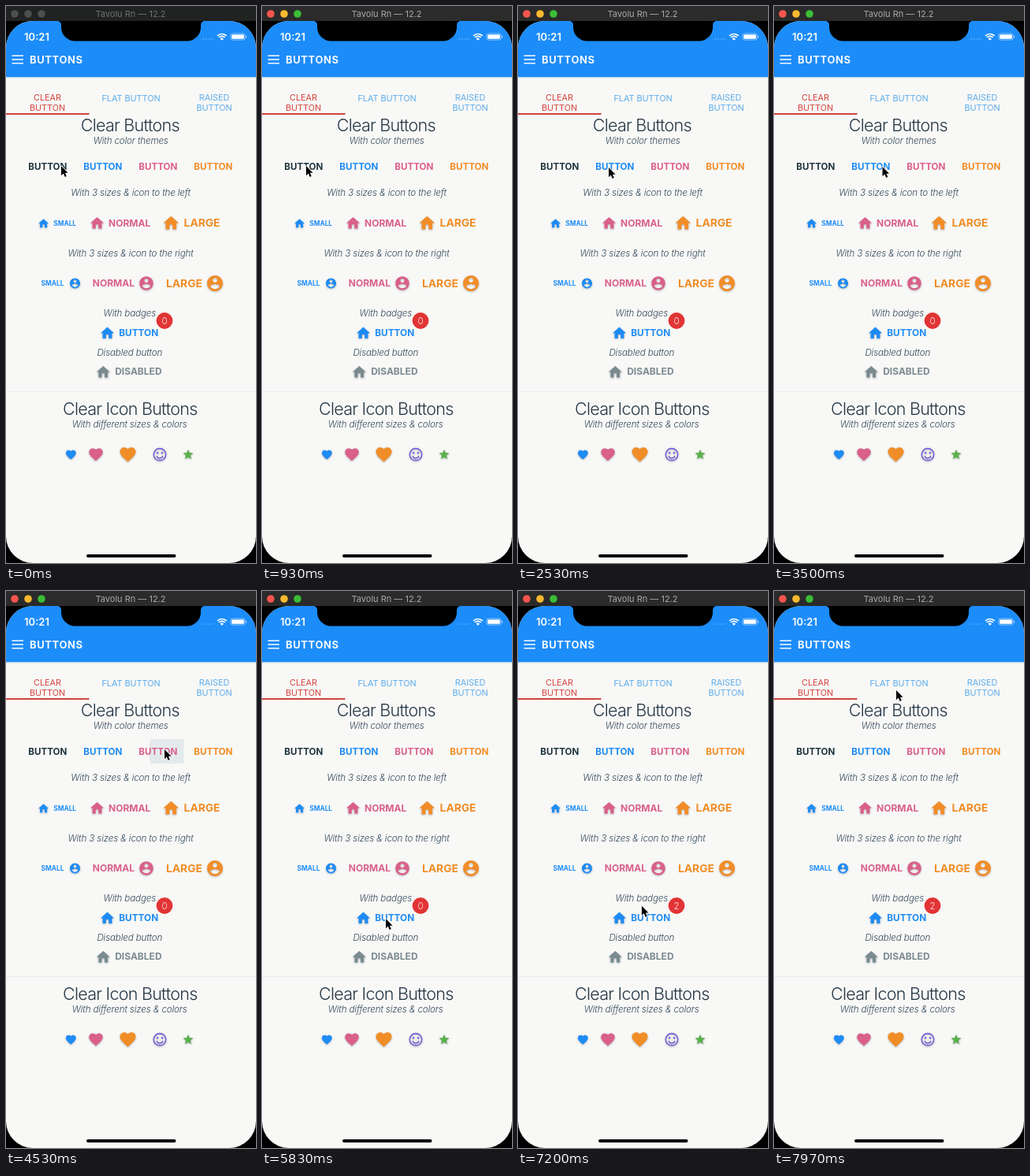
An HTML page with a canvas that plays this animation: 317x707 px, repeating every 8 s.

```html
<!DOCTYPE html>
<html lang="en">
<head>
<meta charset="utf-8">
<title>Buttons</title>
<style>
html, body { margin: 0; width: 100%; height: 100%; overflow: hidden; background: #000; }
canvas { display: block; width: 317px; height: 707px; }
</style>
</head>
<body>
<canvas id="stage"></canvas>
<script>
const W = 317, H = 707, LOOP = 8000;
const canvas = document.getElementById('stage');
const ctx = canvas.getContext('2d');
const ratio = window.devicePixelRatio || 1;
canvas.width = W * ratio;
canvas.height = H * ratio;

const BLUE = '#1e8cf5', PINK = '#da6089', ORANGE = '#f18d27', NAVY = '#20353f';
const RED = '#d2443d', SLATE = '#7a8b91', PURPLE = '#7b62d8', GREEN = '#5bb04d';
const PAPER = '#f8f8f6';

const ICONS = {
  home: new Path2D('M10 20v-6h4v6h5v-8h3L12 3 2 12h3v8z'),
  user: new Path2D('M12 2C6.48 2 2 6.48 2 12s4.48 10 10 10 10-4.48 10-10S17.52 2 12 2zm0 3c1.66 0 3 1.34 3 3s-1.34 3-3 3-3-1.34-3-3 1.34-3 3-3zm0 14.2c-2.5 0-4.71-1.28-6-3.22.03-1.99 4-3.08 6-3.08 1.99 0 5.97 1.09 6 3.08-1.29 1.94-3.5 3.22-6 3.22z'),
  heart: new Path2D('M12 21.35l-1.45-1.32C5.4 15.36 2 12.28 2 8.5 2 5.42 4.42 3 7.5 3c1.74 0 3.41.81 4.5 2.09C13.09 3.81 14.76 3 16.5 3 19.58 3 22 5.42 22 8.5c0 3.78-3.4 6.86-8.55 11.54z'),
  star: new Path2D('M12 17.27L18.18 21l-1.64-7.03L22 9.24l-7.19-.61L12 2 9.19 8.63 2 9.24l5.46 4.73L5.82 21z')
};
const NOTCH = new Path2D('M65 18H252V19A5 5 0 0 0 247 24V27A17.5 17.5 0 0 1 229.5 44.5H87.5A17.5 17.5 0 0 1 70 27V24A5 5 0 0 0 65 19Z');
const ARROW = new Path2D('M0 0V12.2L2.8 9.6L4.7 14L6.8 13.1L4.9 8.8H8.6Z');

// Pointer stops: time, x, y
const STOPS = [
  [0, 70, 203], [600, 56, 203], [2000, 56, 203], [2450, 115, 205],
  [3300, 115, 205], [3900, 201, 201], [4800, 201, 201], [5600, 157, 416],
  [7100, 157, 416], [7800, 155, 126], [LOOP, 155, 126]
];
const FOCUS = 700;
const BADGE_TAPS = [6000, 6750];
// Taps: time, then the button box
const TAPS = [
  [1350, 21, 188, 64.5, 31], [2750, 91, 188, 64.5, 31], [4250, 161, 188, 64.5, 31],
  ...BADGE_TAPS.map(t => [t - 100, 110, 399, 96, 31])
];

function text(str, x, y, font, color, align = 'center', spacing = 0) {
  ctx.font = font + ' Inter, sans-serif';
  ctx.letterSpacing = spacing + 'px';
  ctx.textAlign = align;
  ctx.fillStyle = color;
  ctx.fillText(str, x, y);
}
const heading = (s, y) => text(s, 157.3, y, '300 21.5px', '#263846', 'center', -0.74);
const caption = (s, x, y) => text(s, x, y, 'italic 300 11.6px', '#33485a', 'center', -0.14);
const label = (s, x, y, color, size = 11.8) => text(s, x, y, `700 ${size}px`, color, 'left');
const tab = (s, x, y, color) => text(s, x, y, '400 10.8px', color);

function rect(x, y, w, h, color) {
  ctx.fillStyle = color;
  ctx.fillRect(x, y, w, h);
}

function disc(x, y, r, color) {
  ctx.fillStyle = color;
  ctx.beginPath();
  ctx.arc(x, y, r, 0, 7);
  ctx.fill();
}

function pill(x, y, w, h, r, color) {
  ctx.fillStyle = color;
  ctx.beginPath();
  ctx.roundRect(x, y, w, h, r);
  ctx.fill();
}

function softShadow() {
  ctx.shadowColor = 'rgba(50, 60, 80, .35)';
  ctx.shadowBlur = 2.5 * ratio;
  ctx.shadowOffsetY = ratio;
}

// The glyphs span 20 of the 24 grid units
function icon(name, x, y, width, color) {
  const k = width / 20;
  ctx.save();
  softShadow();
  ctx.translate(x, y);
  ctx.scale(k, k);
  ctx.translate(-12, -12);
  ctx.fillStyle = color;
  ctx.fill(ICONS[name]);
  ctx.restore();
}

function smiley(x, y) {
  ctx.save();
  softShadow();
  ctx.strokeStyle = PURPLE;
  ctx.lineWidth = 1.6;
  ctx.beginPath();
  ctx.arc(x, y, 7.7, 0, 7);
  ctx.stroke();
  ctx.beginPath();
  ctx.arc(x, y + 0.4, 4.2, 0.35, Math.PI - 0.35);
  ctx.stroke();
  disc(x - 2.9, y - 2.1, 1.25, PURPLE);
  disc(x + 2.9, y - 2.1, 1.25, PURPLE);
  ctx.restore();
}

function pointer(t) {
  const i = STOPS.findIndex(s => s[0] > t);
  const [t0, x0, y0] = STOPS[i - 1], [t1, x1, y1] = STOPS[i];
  const p = (t - t0) / (t1 - t0), e = p * p * (3 - 2 * p);
  return [x0 + (x1 - x0) * e, y0 + (y1 - y0) * e];
}

function ripples(t) {
  for (const [start, x, y, w, h] of TAPS) {
    const age = t - start;
    if (age < 0 || age > 500) continue;
    const px = pointer(start)[0];
    ctx.save();
    ctx.beginPath();
    ctx.rect(x, y, w, h);
    ctx.clip();
    ctx.globalAlpha = Math.min(1, (500 - age) / 200);
    const grow = Math.min(1, age / 280);
    disc(px + 30, y + h / 2, 50 * (1 - (1 - grow) ** 2), '#e4eaec');
    ctx.restore();
  }
}

function titleBar(active) {
  rect(0, 0, W, 19, active ? '#2a2b2a' : '#202321');
  ['#f8564e', '#f6b930', '#3cbd38'].forEach((c, i) =>
    disc(11 + 17 * i, 10, 4.8, active ? c : '#4e504e'));
  text('Tavolu Rn — 12.2', 158, 14, '400 11px', active ? '#a9aaa8' : '#70726f');
}

function statusBar() {
  text('10:21', 39, 43.5, '600 13px', '#fff');
  for (let i = 0; i < 4; i++) disc(250 + 4 * i, 42, 0.8, 'rgba(255,255,255,.45)');
  ctx.strokeStyle = '#fff';
  ctx.lineWidth = 1.7;
  for (const r of [5.2, 8]) {
    ctx.beginPath();
    ctx.arc(273.8, 43.5, r, -Math.PI * 0.76, -Math.PI * 0.24);
    ctx.stroke();
  }
  ctx.fillStyle = '#fff';
  ctx.beginPath();
  ctx.moveTo(273.8, 43.8);
  ctx.arc(273.8, 43.8, 3, -Math.PI * 0.76, -Math.PI * 0.24);
  ctx.fill();
  ctx.lineWidth = 0.8;
  ctx.strokeStyle = 'rgba(255,255,255,.6)';
  ctx.beginPath();
  ctx.roundRect(284.9, 34.9, 18.2, 8.2, 2.4);
  ctx.stroke();
  pill(286.2, 36.2, 15.6, 5.6, 1.4, '#fff');
  pill(304, 37.5, 1.1, 3, 0.5, 'rgba(255,255,255,.6)');
}

function header() {
  rect(0, 90, W, 1, '#b4d3ee');
  rect(0, 91, W, 1, '#e8eef2');
  rect(0, 19, W, 71, '#1c8cf9');
  ctx.fillStyle = '#000';
  ctx.fill(NOTCH);
  statusBar();
  for (const y of [62.3, 67.1, 71.9]) rect(7.5, y, 14.5, 1.6, '#eef5ff');
  text('BUTTONS', 30, 72.6, '700 13px', '#f4f8ff', 'left', 0.6);
}

function tabs() {
  const idle = '#5dacec';
  tab('CLEAR', 52.5, 120, RED);
  tab('BUTTON', 52.5, 133, RED);
  tab('FLAT BUTTON', 158.5, 121, idle);
  tab('RAISED', 264, 120, idle);
  tab('BUTTON', 264, 133, idle);
  rect(0, 136, 105.5, 2, RED);
}

function content(t) {
  heading('Clear Buttons', 159.2);
  caption('With color themes', 158.2, 175);
  ripples(t);
  [NAVY, BLUE, PINK, ORANGE].forEach((c, i) => label('BUTTON', 28.3 + 70 * i, 208, c, 11.6));

  caption('With 3 sizes & icon to the left', 158, 241.4);
  icon('home', 47.6, 276, 13, BLUE);
  label('SMALL', 60.3, 278.5, BLUE, 8.3);
  icon('home', 115.5, 275.6, 17, PINK);
  label('NORMAL', 130, 279.6, PINK, 12);
  icon('home', 209.3, 275.6, 19.5, ORANGE);
  label('LARGE', 225.6, 280.2, ORANGE, 13.8);

  caption('With 3 sizes & icon to the right', 158, 318);
  label('SMALL', 44.6, 355, BLUE, 8.3);
  icon('user', 87.5, 352, 13, BLUE);
  label('NORMAL', 109.8, 356.2, PINK, 12);
  icon('user', 178, 352, 17.5, PINK);
  label('LARGE', 203, 356.8, ORANGE, 13.8);
  icon('user', 265, 352, 20, ORANGE);

  caption('With badges', 156.8, 394.4);
  icon('home', 128.5, 415.2, 17, BLUE);
  label('BUTTON', 143.3, 419.2, BLUE);
  disc(201, 399.5, 10.4, '#e23434');
  text(BADGE_TAPS.filter(b => t >= b).length, 201, 403.6, '300 11.5px', '#fbeeee');

  caption('Disabled button', 156.8, 444);
  icon('home', 123.3, 464.6, 17, SLATE);
  label('DISABLED', 138.2, 468.4, SLATE, 12);

  rect(0, 489, W, 1, '#e9ebf0');
  heading('Clear Icon Buttons', 519.2);
  caption('With different sizes & colors', 156.7, 535.4);
  icon('heart', 82.3, 569.5, 13, BLUE);
  icon('heart', 114, 569.3, 17.5, PINK);
  icon('heart', 154.5, 569.3, 20, ORANGE);
  smiley(195, 569.3);
  icon('star', 231, 569.2, 13, GREEN);
}

function cursor(t) {
  const [x, y] = pointer(t);
  ctx.save();
  ctx.translate(x, y);
  ctx.lineJoin = 'round';
  ctx.lineWidth = 1.6;
  ctx.strokeStyle = '#fff';
  ctx.stroke(ARROW);
  ctx.fillStyle = '#000';
  ctx.fill(ARROW);
  ctx.restore();
}

function draw(t) {
  ctx.setTransform(ratio, 0, 0, ratio, 0, 0);
  rect(0, 0, W, H, '#000');
  ctx.save();
  ctx.beginPath();
  ctx.roundRect(0, 19, W, H - 19, 34);
  ctx.clip();
  rect(0, 19, W, H - 19, PAPER);
  header();
  tabs();
  content(t);
  pill(102, 696, 113.5, 4, 2, '#000');
  ctx.restore();
  titleBar(t >= FOCUS);
  cursor(t);
}

const begin = performance.now();
function tick() {
  draw((performance.now() - begin) % LOOP);
  requestAnimationFrame(tick);
}
tick();
</script>
</body>
</html>
```
